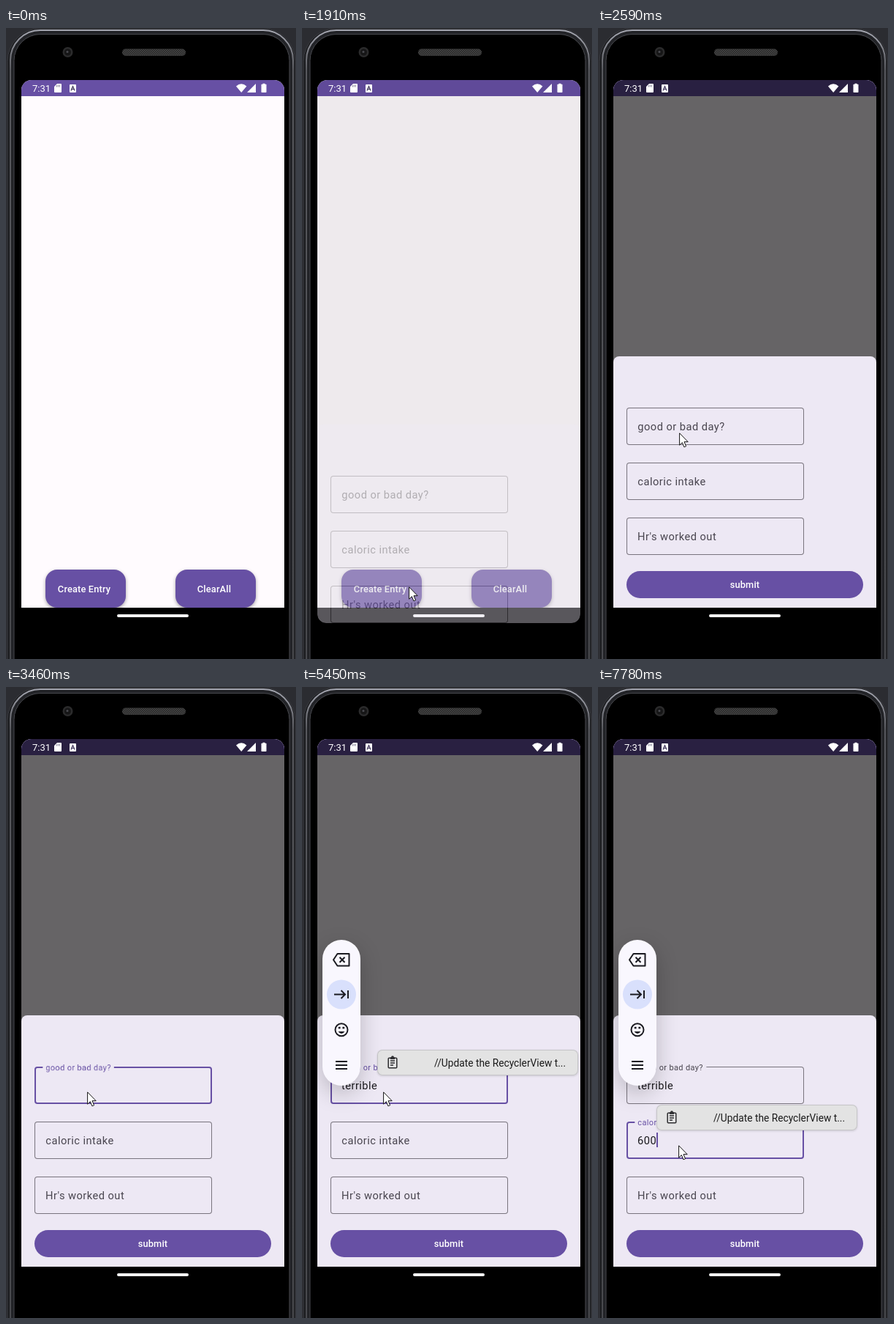
Animation of 397 by 861 pixels, one loop 8 s. Source, as an HTML page:

```html
<!DOCTYPE html>
<html lang="en">
<head>
<meta charset="utf-8">
<title>Day log entry</title>
<style>
:root { --purple: #6750a4; --sheet: #ede8f4; --ink: #1c1b1f; --muted: #49454f; }
html, body { margin: 0; width: 100%; height: 100%; overflow: hidden; background: #000; }
body { position: relative; font: 14.67px Roboto, sans-serif; }
div, svg { left: 0; top: 0; }
div, svg, span { position: absolute; box-sizing: border-box; white-space: nowrap; }

/* every timed part shares one 8 s clock; 1% = 80 ms */
.timed, .typed::before { animation: 8s step-end infinite; }

.screen { left: 21px; top: 71px; width: 360px; height: 741px; overflow: hidden; border-radius: 14px 14px 12px 12px; background: #000; }
.page { width: 360px; height: 720px; overflow: hidden; background: #fffbfe; }
.bar { width: 360px; height: 22px; background: var(--purple); }
.button { top: 668px; width: 110px; height: 52px; padding-right: 4px; overflow: hidden; border-radius: 16px; background: var(--purple); color: #fff;
  font-size: 12.83px; font-weight: 500; letter-spacing: .15px; line-height: 53px; text-align: center; box-shadow: 0 2px 5px rgba(0,0,0,.35); }
.ripple { left: 80px; top: 11px; width: 24px; height: 24px; border-radius: 50%; background: rgba(255,255,255,.25); animation-name: ripple; }
.scrim { width: 360px; height: 741px; background: #000; animation-name: scrim; }
.home { left: 131px; top: 729px; width: 98px; height: 4px; border-radius: 2px; background: #f4f4f4; }
.status { left: 15px; top: 3px; color: #fff; font-size: 13px; line-height: 17px; }

.sheet { top: 377px; width: 360px; height: 343px; border-radius: 8px 8px 0 0; background: var(--sheet); animation-name: sheet; }
.field { left: 18px; width: 243px; height: 51px; }
.outline { inset: 0; border-radius: 4px; box-shadow: inset 0 0 0 1px #79747e; }
.label { left: 9.67px; top: 15.5px; padding: 0 5.33px; line-height: 20px; letter-spacing: .46px; color: var(--muted);
  background: var(--sheet); transform-origin: 5.33px 50%; }
.typed { left: 15px; top: 0; height: 51px; line-height: 52px; letter-spacing: .46px; color: var(--ink); }
.typed::before { content: ""; }
.caret { top: 15px; width: 2px; height: 20px; background: var(--purple); }
.popup { top: -23px; width: 275px; height: 35px; border-radius: 7px; color: #1b1b1b; font-size: 13.75px; letter-spacing: 0; line-height: 36px; }
.popup span { left: 78px; top: 0; }
.submit { left: 18px; top: 293px; width: 324px; height: 37px; border-radius: 19px; background: var(--purple); color: #fff;
  font-size: 12.83px; font-weight: 500; letter-spacing: .15px; line-height: 38px; text-align: center; }
.day { top: 70px; z-index: 1; }
.food { top: 145px; z-index: 2; }
.work { top: 220px; }
.day .outline { animation-name: day-outline; }
.day .label { animation-name: day-label; }
.day .typed::before { animation-name: day-text; }
.day .caret { animation-name: day-caret; }
.day .popup { animation-name: day-popup; }
.food .outline { animation-name: food-outline; }
.food .label { animation-name: food-label; }
.food .typed::before { animation-name: food-text; }
.food .caret { animation-name: food-caret; }
.food .popup { animation-name: food-popup; }

.tools { left: 28px; top: 345px; width: 52px; height: 199px; border-radius: 26px; background: #f9f7fe; animation-name: tools;
  box-shadow: 0 10px 30px rgba(0,0,0,.22); clip-path: inset(-30px -60px -60px -7px); }
.cursor { width: 13px; height: 21px; animation-name: cursor; }

@keyframes cursor {
  0% { opacity: 0; transform: translate(304px,803px); }
  4.75% { opacity: 1; transform: translate(304px,803px); }
  5.59% { transform: translate(284px,790px); }
  6.41% { transform: translate(246px,772px); }
  7.25% { transform: translate(204px,761px); }
  8.09% { transform: translate(173px,759px); }
  8.91% { transform: translate(154px,760px); }
  9.75% { transform: translate(146px,762px); }
  27.25% { transform: translate(144px,748px); }
  28.1% { transform: translate(137px,708px); }
  28.9% { transform: translate(127px,650px); }
  29.75% { transform: translate(119px,598px); }
  30.6% { transform: translate(114px,568px); }
  31.4% { transform: translate(112px,556px); }
  32.375% { transform: translate(111px,552px); }
  68.9% { transform: translate(111px,558px); }
  69.7% { transform: translate(111px,577px); }
  70.6% { transform: translate(110px,600px); }
  71.4% { transform: translate(110px,617px); }
  72.2%, 100% { opacity: 1; transform: translate(110px,625px); }
}
@keyframes ripple {
  0% { opacity: 0; transform: none; }
  13% { opacity: 1; transform: none; }
  14.75% { opacity: 1; transform: none; animation-timing-function: steps(6); }
  19.625%, 100% { opacity: 0; transform: scale(9); }
}
@keyframes sheet {
  0% { opacity: 0; transform: translateY(148px); }
  23% { opacity: .095; transform: translateY(134px); }
  23.875% { opacity: .38; transform: translateY(93px); }
  24.75% { opacity: .715; transform: translateY(42px); }
  25.5% { opacity: .935; transform: translateY(10px); }
  26.375%, 100% { opacity: 1; transform: none; }
}
@keyframes scrim {
  0% { opacity: 0; }
  23.875% { opacity: .067; }
  24.75% { opacity: .35; }
  25.5%, 100% { opacity: .6; }
}
@keyframes day-outline {
  34.875% { box-shadow: inset 0 0 0 2px var(--purple); }
  75.625%, 100% { box-shadow: inset 0 0 0 1px #79747e; }
}
@keyframes day-label {
  0% { transform: none; color: var(--muted); }
  34.875% { transform: none; color: var(--purple); animation-timing-function: ease; }
  37.3% { transform: translateY(-24.5px) scale(.75); color: var(--purple); }
  75.625%, 100% { transform: translateY(-24.5px) scale(.75); color: var(--muted); }
}
@keyframes day-text {
  0% { content: ""; }
  53.125% { content: "t"; }
  57.3% { content: "te"; }
  58.1% { content: "ter"; }
  59.75% { content: "terr"; }
  60.6% { content: "terri"; }
  61.4% { content: "terrib"; }
  63.05% { content: "terribl"; }
  63.875%, 100% { content: "terrible"; }
}
@keyframes day-caret {
  0%, 43.25% { opacity: 0; }
  35.75%, 49% { opacity: 1; }
  68.125%, 100% { opacity: 0; }
}
@keyframes day-popup {
  0% { opacity: 0; background: #fff; box-shadow: inset 0 0 0 1px #e0dfe3, 0 2px 8px rgba(0,0,0,.3); }
  57.3% { opacity: 1; background: #fff; box-shadow: inset 0 0 0 1px #e0dfe3, 0 2px 8px rgba(0,0,0,.3); }
  58.1% { opacity: 1; background: #e3e3e3; box-shadow: inset 0 0 0 1px #c6c5c8, 0 1px 3px rgba(0,0,0,.14); }
  78.25% { opacity: .5; background: #e3e3e3; box-shadow: inset 0 0 0 1px #c6c5c8, 0 1px 3px rgba(0,0,0,.14); }
  79.875%, 100% { opacity: 0; }
}
@keyframes food-outline {
  75.625%, 100% { box-shadow: inset 0 0 0 2px var(--purple); }
}
@keyframes food-label {
  0% { transform: none; color: var(--muted); }
  75.625% { transform: none; color: var(--purple); animation-timing-function: ease; }
  78.25%, 100% { transform: translateY(-24.5px) scale(.75); color: var(--purple); }
}
@keyframes food-text {
  0% { content: ""; }
  92.375% { content: "6"; }
  95.625% { content: "60"; }
  97.25%, 100% { content: "600"; }
}
@keyframes food-caret {
  0%, 82.375% { opacity: 0; }
  75.625%, 89%, 100% { opacity: 1; }
}
@keyframes food-popup {
  0% { opacity: 0; background: #fff; box-shadow: inset 0 0 0 1px #e0dfe3, 0 2px 8px rgba(0,0,0,.3); }
  82.375% { opacity: 1; background: #fff; box-shadow: inset 0 0 0 1px #e0dfe3, 0 2px 8px rgba(0,0,0,.3); }
  93.125%, 100% { opacity: 1; background: #e3e3e3; box-shadow: inset 0 0 0 1px #c6c5c8, 0 1px 3px rgba(0,0,0,.14); }
}
@keyframes tools {
  0% { opacity: 0; }
  56.5% { opacity: .3; animation-timing-function: ease-out; }
  58.9%, 100% { opacity: 1; }
}
</style>
</head>
<body>

<!-- phone body -->
<svg width="397" height="861">
  <defs>
    <pattern id="mesh" width="3" height="3" patternUnits="userSpaceOnUse">
      <path d="M0 0h1.5v1.5h-1.5zM1.5 1.5h1.5v1.5h-1.5z" fill="#4a4a4a"/>
    </pattern>
    <linearGradient id="rim" x2="0" y2="1">
      <stop offset="0" stop-color="#a4a6b0"/><stop offset=".06" stop-color="#58595e"/><stop offset="1" stop-color="#47484c"/>
    </linearGradient>
  </defs>
  <rect width="397" height="861" fill="#2b2c31"/>
  <rect x="2" y=".5" width="394" height="920" rx="45" fill="#1d1e21" stroke="#3a3b40"/>
  <rect x="6" y="3" width="387" height="920" rx="41" fill="#222327" stroke="url(#rim)" stroke-width="2"/>
  <rect x="11" y="8.5" width="377" height="920" rx="36" fill="#000" stroke="#48494e"/>
  <circle cx="84.5" cy="33" r="7" fill="#2b2b2c"/>
  <circle cx="84.5" cy="33" r="4.5" fill="#161617"/>
  <circle cx="84" cy="32.5" r="1.5" fill="#4a4b50"/>
  <rect x="159" y="28.5" width="87" height="9.5" rx="4.7" fill="#242424"/>
  <rect x="159" y="28.5" width="87" height="9.5" rx="4.7" fill="url(#mesh)"/>
</svg>

<div class="screen">
  <div class="page">
    <div class="bar"></div>
    <div class="button" style="left:33px"><div class="ripple timed"></div>Create Entry</div>
    <div class="button" style="left:211px">ClearAll</div>
  </div>
  <div class="scrim timed"></div>
  <div class="home"></div>
  <div class="status">7:31</div>
  <svg width="360" height="22" fill="#fff">
    <path d="M49 5h5q1 0 1 1v10q0 1-1 1h-8q-1 0-1-1V9z"/>
    <path d="M48.5 7v2.5M50.5 6.5v3M52.5 6.5v3" stroke="#6b6780" stroke-width=".8"/>
    <rect x="66" y="6" width="9" height="11" rx="1"/>
    <path d="M68 14.5l2.500-6 2.500 6M69 12.5h3" fill="none" stroke="#3d3358" stroke-width="1.2"/>
    <path d="M294 8.5q7.2-6.5 14.4 0L301.2 17z"/>
    <path d="M309 17L321 5v12z"/>
    <path d="M329 5.8h1.5V4.7h3v1.1h1.5q.5 0 .5.5v10q0 .7-.7.7h-5.6q-.7 0-.7-.7v-10q0-.5.5-.5z"/>
  </svg>

  <div class="sheet timed">
    <div class="field day">
      <div class="outline timed"></div>
      <div class="label timed">good or bad day?</div>
      <div class="typed"><span class="caret timed"></span><span class="popup timed"><svg width="42" height="35"><use href="#clip"/></svg><span>//Update the RecyclerView t...</span></span></div>
    </div>
    <div class="field food">
      <div class="outline timed"></div>
      <div class="label timed">caloric intake</div>
      <div class="typed"><span class="caret timed"></span><span class="popup timed"><svg width="42" height="35"><use href="#clip"/></svg><span>//Update the RecyclerView t...</span></span></div>
    </div>
    <div class="field work">
      <div class="outline"></div>
      <div class="label">Hr's worked out</div>
    </div>
    <div class="submit">submit</div>
  </div>
</div>

<!-- keyboard toolbar -->
<div class="tools timed">
  <svg width="52" height="199" fill="none" stroke="#1b1b21" stroke-width="2">
    <path d="M20.5 19H36.5V35.5H20.5L15 27.2z" stroke-linejoin="round"/>
    <path d="M23.5 23.7l7 7M30.5 23.7l-7 7"/>
    <circle cx="26" cy="74.5" r="20" fill="#d9e0fc" stroke="none"/>
    <path d="M16 74.5h14.5M25.5 69l5.5 5.5-5.5 5.5M35 69v11"/>
    <circle cx="26" cy="122.7" r="8.5"/>
    <path d="M21.5 125q4.5 6 9 0z" fill="#1b1b21" stroke="none"/>
    <path d="M21.8 120h2.8M27.4 120h2.8" stroke-width="2.6"/>
    <path d="M18 166h16M18 171h16M18 176h16"/>
  </svg>
</div>

<svg class="cursor timed" viewBox="0 0 13 21">
  <path d="M.6.8V17.2L4.4 13.7 6.9 19.8 9.6 18.7 7 12.7H12.2z" fill="#fff" stroke="#111"/>
</svg>

<svg width="0" height="0">
  <symbol id="clip" overflow="visible">
    <g fill="none" stroke="#2d2d30" stroke-width="1.5">
      <rect x="15.2" y="11.2" width="11.6" height="13.6" rx="1"/>
      <path d="M18 15h6M18 18h6M18 21h4"/>
      <path d="M18 11.5h6" stroke-width="2.8"/>
      <circle cx="21" cy="10.3" r="1.2"/>
    </g>
  </symbol>
</svg>
</body>
</html>
```
